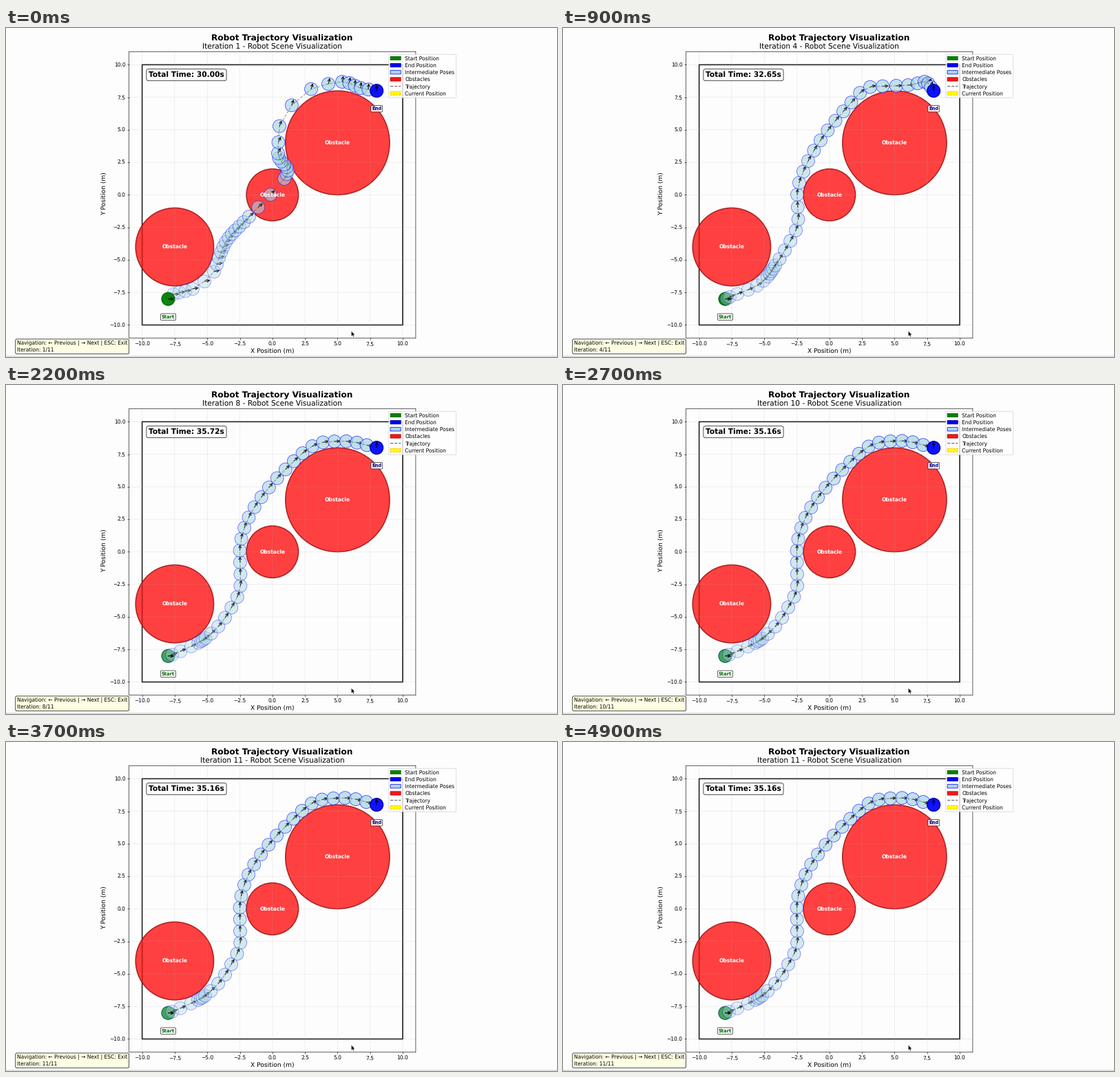
Write a matplotlib script that moves like this. It is 800 px wide and 478 px high and loops after 5 s.

```python
import math

import matplotlib.pyplot as plt
import numpy as np
from matplotlib.animation import FuncAnimation
from matplotlib.lines import Line2D
from matplotlib.patches import Circle, FancyArrowPatch, Patch, Polygon, Rectangle

W, H, DPI = 800, 478, 54.4
FRAMES, INTERVAL = 50, 100
LAST = 11
RADIUS = 0.5
START, END = (-8, -8), (8, 8)
PAPER = "#fdfdfd"

# Unhinted, unsnapped drawing keeps the soft look of a scaled-down window.
plt.rcParams.update({"font.family": "DejaVu Sans", "text.hinting": "none",
                     "path.snap": False})


def spline(knots):
    """Monotone cubic through (index, x, y) knots, sampled at every whole index."""
    k = np.array(knots, float)
    t, p = k[:, 0], k[:, 1:]
    d = np.diff(p, axis=0) / np.diff(t)[:, None]
    a, b = d[:-1], d[1:]
    same = a * b > 0
    inner = np.where(same, 2 * a * b / np.where(same, a + b, 1), 0)
    m = np.vstack([d[:1], inner, d[-1:]])
    s = np.arange(t[-1] + 1)
    i = np.clip(np.searchsorted(t, s, "right") - 1, 0, len(t) - 2)
    h = (t[i + 1] - t[i])[:, None]
    u = (s - t[i])[:, None] / h
    return ((2 * u**3 - 3 * u**2 + 1) * p[i] + (u**3 - 2 * u**2 + u) * h * m[i]
            + (3 * u**2 - 2 * u**3) * p[i + 1] + (u**3 - u**2) * h * m[i + 1])


def solve(knots, turn=1):
    """Poses (x, y, heading): along the path, then `turn` steps to face up."""
    xy = spline(knots)
    d = np.gradient(xy, axis=0)
    head = np.unwrap(np.arctan2(d[:, 1], d[:, 0]))
    head[0] = 0
    head[-turn - 1:] = np.linspace(head[-turn - 1], math.pi / 2, turn + 1)
    return np.column_stack([xy, head])


# Turning points of the path, and where the robot slows down
GUESS = solve([
    (0, -8, -8), (1, -7.6, -7.64), (4, -6.12, -7.22), (6, -4.48, -5.9),
    (8, -4.11, -4.84), (11, -3.58, -3.63), (17, -1.79, -1.67), (19, -0.15, 0.02),
    (20, 0.91, 1.24), (22, 1.17, 1.87), (27, 0.43, 3.2), (29, 0.54, 5.28),
    (31, 2.97, 8.13), (33, 5.35, 8.69), (36, 6.78, 8.21), (38, 8, 8)])
GUESS[:, 2] = np.linspace(0, math.pi / 2, len(GUESS))
DETOUR = solve([
    (0, -7.87, -7.97), (1, -7.65, -7.85), (4, -5.54, -6.96), (6, -4.75, -6.27),
    (10, -4.16, -5.42), (12, -3.42, -4.26), (15, -2.39, -1.88), (17, -2.47, 0.02),
    (19, -2, 1.79), (26, 1.68, 7.1), (28, 3.13, 8.29), (31, 6.04, 8.43),
    (33, 7.3, 8.69), (36, 8, 8)], turn=5)
SMOOTHED = solve([
    (0, -8, -8), (1, -7.65, -7.9), (4, -5.49, -6.85), (7, -4.8, -6.32),
    (10, -3.61, -5.16), (12, -2.53, -3.63), (14, -2.21, -1.75), (16, -2.5, 0.15),
    (18, -2, 2), (24, 1.38, 6.68), (26, 2.76, 8.03), (28, 4.64, 8.58),
    (31, 7.46, 8.05), (33, 8, 8.12)], turn=2)
FINAL = solve([
    (0, -8, -8), (1, -7.7, -7.9), (4, -5.7, -7), (7, -5.17, -6.67),
    (9, -4.16, -5.74), (11, -3.16, -4.26), (13, -2.47, -2.6), (16, -2.5, 0.1),
    (18, -2.16, 1.84), (25, 1.6, 6.92), (28, 3.8, 8.4), (30, 5.56, 8.53),
    (33, 8, 8)])


def resample(path, n):
    s, t = np.linspace(0, 1, n), np.linspace(0, 1, len(path))
    return np.column_stack([np.interp(s, t, c) for c in path.T])


def blend(a, b, f):
    n = round(len(a) + (len(b) - len(a)) * f)
    return resample(a, n) * (1 - f) + resample(b, n) * f


def poses_at(it):
    if it <= 4:
        return blend(GUESS, DETOUR, (it - 1) / 3)
    if it <= 6:
        return blend(DETOUR, SMOOTHED, (it - 4) / 2)
    # The solver closes in on the final path geometrically.
    return blend(FINAL, SMOOTHED, 0.3 ** (min(it, 10) - 6))


def total_time(it):
    return np.interp(it, [1, 4, 6, 8, 10], [30, 32.65, 37, 35.72, 35.16])


def iteration(frame):
    return min(LAST, 2 + math.floor((frame - 1) / 3.15))


# The tiny surplus keeps the pixel size from rounding down.
fig = plt.figure(figsize=((W + 0.001) / DPI, (H + 0.001) / DPI), dpi=DPI,
                 facecolor=PAPER)
ax = fig.add_axes([178.7 / W, 1 - 450.4 / H, 416.2 / W, 415.9 / H], facecolor=PAPER)
ax.set_xlim(-11, 11)
ax.set_ylim(-11, 11)
ticks = np.arange(-10, 10.1, 2.5)
ax.set_xticks(ticks)
ax.set_yticks(ticks)
ax.grid(True, alpha=0.3)


def px(x, y):
    return x / W, 1 - y / H


def caption(x, y, text, size, **style):
    return fig.text(*px(x, y), text, fontsize=size, ha="center", va="baseline",
                    rotation_mode="anchor", **style)


def label(x, y, text, color):
    ax.text(x, y - 1.2, text, color=color, fontsize=9, weight="bold", ha="center",
            va="top", zorder=5,
            bbox=dict(boxstyle="round,pad=0.2", fc="white", ec="black", alpha=0.8))


def disc(center, r, fill, edge, **style):
    return ax.add_patch(Circle(center, r, fc=fill, ec=edge, **style))


def arrow(x, y, heading, z):
    tip = (x + 0.55 * math.cos(heading), y + 0.55 * math.sin(heading))
    return ax.add_patch(FancyArrowPatch(
        (x, y), tip, arrowstyle="->", mutation_scale=12, shrinkA=0, lw=1.5,
        color="black", alpha=0.85, zorder=z))


# Static scene
ax.add_patch(Rectangle((-10, -10), 20, 20, fill=False, ec="black", lw=2))
for ox, oy, r in [(-7.5, -4, 3), (0, 0, 2), (5, 4, 4)]:
    disc((ox, oy), r, "red", "darkred", lw=2, alpha=0.75)
    ax.text(ox, oy, "Obstacle", color="white", fontsize=10, weight="bold",
            ha="center", va="center", zorder=4)

start = disc(START, RADIUS, "green", "darkgreen", lw=1.5, alpha=0.95)
disc(END, RADIUS, "blue", "darkblue", lw=1.5, alpha=0.92, zorder=2.2)
arrow(*START, 0, 3)
arrow(*END, math.pi / 2, 3)
label(*START, "Start", "darkgreen")
label(*END, "End", "darkblue")

ax.legend(handles=[
    Patch(fc="green", ec="darkgreen", label="Start Position"),
    Patch(fc="blue", ec="darkblue", label="End Position"),
    Patch(fc="lightblue", ec="blue", label="Intermediate Poses"),
    Patch(fc="red", ec="darkred", alpha=0.92, label="Obstacles"),
    Line2D([], [], color="black", ls="--", lw=1.5, alpha=0.6, label="Trajectory"),
    Patch(fc="yellow", ec="orange", ls="--", label="Current Position"),
], loc="upper right", bbox_to_anchor=(1.15, 1), fontsize=10,
    labelspacing=0.32, borderpad=0.3)

caption(400.4, 17.4, "Robot Trajectory Visualization", 16, weight="bold")
caption(386.8, 473.3, "X Position (m)", 12)
caption(145.4, 241, "Y Position (m)", 12, rotation=90)
fig.add_artist(Line2D([0, 1], [1 - 477 / H] * 2, color="#b4b4b4", lw=1))
cursor = [(501.5, 440.5), (501.5, 447.8), (503.2, 446.2), (504.3, 448.8),
          (505.4, 448.3), (504.3, 445.8), (506.4, 445.6)]
fig.add_artist(Polygon([px(*p) for p in cursor], fc="black", ec="white", lw=0.3,
                       transform=fig.transFigure))

# Parts that change with the iteration
title = caption(386.8, 30, "", 14)
total = ax.text(-9.5, 9.5, "", fontsize=14, weight="bold", va="top", zorder=5,
                bbox=dict(boxstyle="round,pad=0.3", fc="white", ec="black", alpha=0.9))
nav = fig.text(*px(16, 471.4), "", fontsize=10, va="bottom",
               bbox=dict(boxstyle="round,pad=0.3", fc="lightyellow", ec="black", alpha=0.9))
track, = ax.plot([], [], "--", color="dimgray", lw=1.5, alpha=0.6, zorder=2.1)
moving = []


def update(frame):
    while moving:
        moving.pop().remove()
    it = iteration(frame)
    poses = poses_at(it)
    title.set_text(f"Iteration {it} - Robot Scene Visualization")
    total.set_text(f"Total Time: {total_time(it):.2f}s")
    nav.set_text("Navigation: ← Previous | → Next | ESC: Exit\n"
                 f"Iteration: {it}/{LAST}")
    track.set_data(poses[:, 0], poses[:, 1])
    start.set_zorder(2.2 if it == 1 else 1.8)
    # Each pose covers the arrows of the ones before it.
    for alpha, (x, y, heading) in zip(np.linspace(0.35, 0.8, len(poses)), poses):
        moving.append(disc((x, y), RADIUS, "lightblue", "blue", lw=1,
                           alpha=alpha, zorder=2))
        moving.append(arrow(x, y, heading, 2))
    return moving


anim = FuncAnimation(fig, update, frames=FRAMES, interval=INTERVAL,
                     init_func=lambda: update(0), repeat=True, repeat_delay=0)
plt.show()
```
